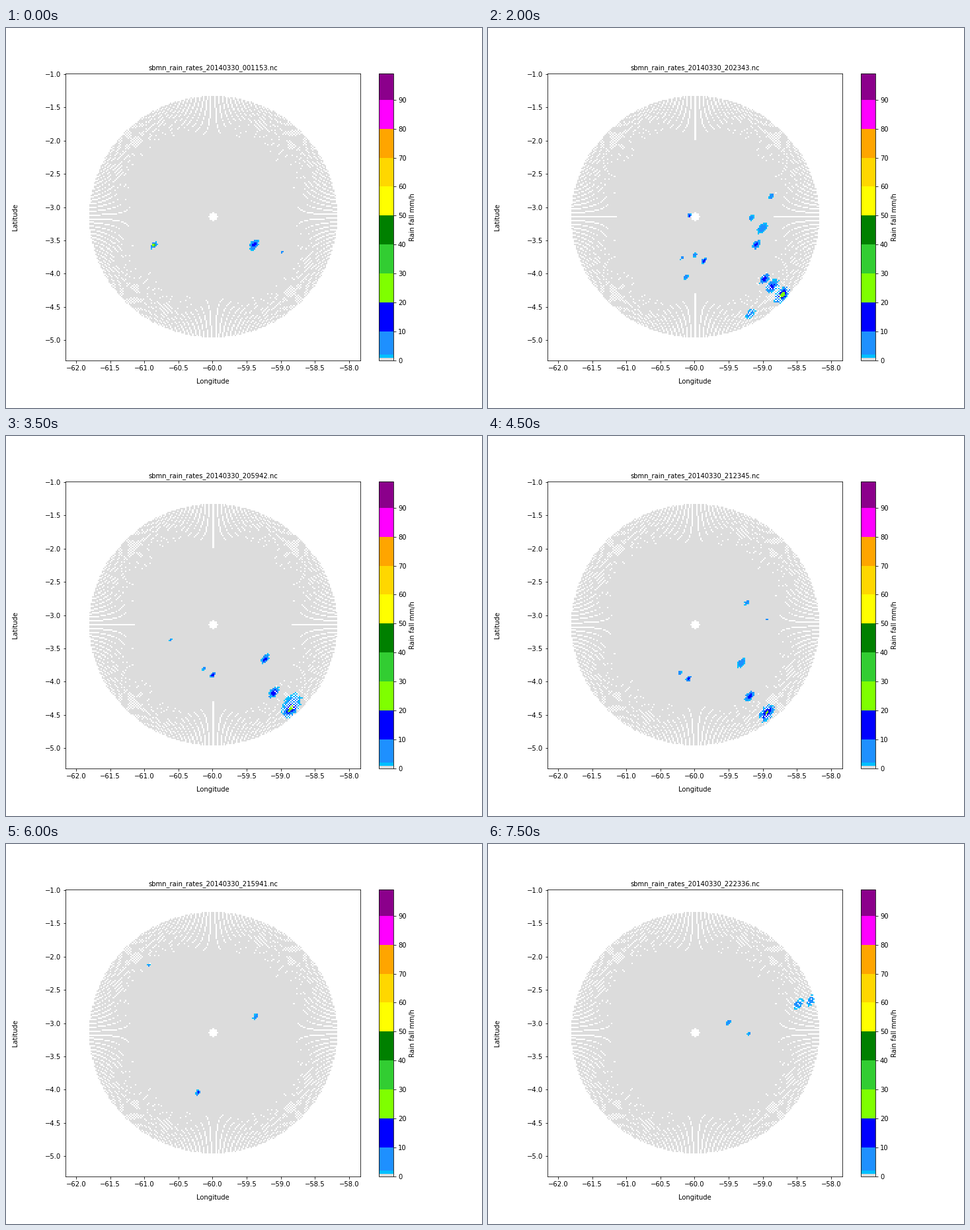
Animation of 720x576 px, one loop 8000 ms. Source, as a matplotlib script:

```python
import numpy as np
import matplotlib.pyplot as plt
from matplotlib.animation import FuncAnimation
from matplotlib.cm import ScalarMappable
from matplotlib.colors import BoundaryNorm, ListedColormap, to_rgba_array

W, H, FRAMES = 720, 576, 16
LON, LAT = -59.992, -3.149          # radar site
SPAN_X, SPAN_Y = 2.1635, 2.157      # half width of the map in degrees
LEFT, RIGHT, TOP, BOTTOM = 90, 536.4, 69.12, 504
CX, CY = (LEFT + RIGHT) / 2, (TOP + BOTTOM) / 2
PX, PY = (RIGHT - LEFT) / 2 / SPAN_X, (BOTTOM - TOP) / 2 / SPAN_Y
CELL, HALF = .02, 95                # grid step in degrees, cells each way
GATES = np.arange(8, 201) / 111.2   # 1 km gates in degrees
WIND = np.array([-4.6, 3])          # pixels per frame
TILT = np.radians(50)

LEVELS = [0, 1, 2, *range(10, 100, 10), 99]
COLORS = ["gainsboro", "deepskyblue", "dodgerblue", "blue", "chartreuse",
          "limegreen", "green", "yellow", "gold", "orange", "magenta",
          "darkmagenta"]
SECONDS = [53, 46, 41, 42, 43, 41, 38, 42, 44, 45, 42, 39, 41, 41, 43, 36]

storms = []


def storm(birth, life, x, y, size, peak):
    storms.append((birth, life, np.array([x, y]), size, peak))


def clock(t):
    """A scan every 12 minutes, first at night, then in the afternoon."""
    minute = 11 + 12 * t if t < 2 else 1175 + 12 * (t - (t > 12))
    return f"{minute // 60:02d}{minute % 60:02d}{SECONDS[t]:02d}"


# night
storm(0, 1, 224, 330, 5, 45)
storm(0, 1, 375, 329, 8, 16)
storm(0, 0, 417, 339, 2.2, 5)
# south-east storm and its flank
storm(3, 8, 449, 402, 14, 30)
storm(3, 8, 423, 377, 9, 20)
storm(3, 2, 434, 389, 11, 15)
storm(5, 2, 440, 402, 18, 7)
storm(3, 2, 401, 430, 8, 4)
# cells over the centre and the east
storm(3, 6, 410, 326, 7, 17)
storm(3, 11, 331, 350, 4.5, 18)
storm(4, 7, 313, 344, 3, 9)
storm(3, 3, 433, 252, 5, 6)
storm(3, 3, 403, 285, 5, 6)
storm(4, 1, 414, 304, 9, 5)
storm(3, 3, 304, 375, 4.5, 6)
storm(4, 2, 304, 285, 3, 14)
storm(9, 6, 391, 253, 4, 10)
# late echoes near the eastern rim
storm(13, 2, 478, 237, 8, 11)
storm(13, 2, 497, 232, 8, 5)

# brief light showers
rng = np.random.default_rng(7)
for birth in range(3, FRAMES):
    r, a = rng.uniform(40, 150), rng.uniform(0, 2 * np.pi)
    storm(birth, 0, CX + r * np.cos(a), CY + r * np.sin(a),
          rng.uniform(1.5, 3), 4)


def rain(t, x, y):
    field = np.zeros(x.shape)
    rough = np.random.default_rng(t).uniform(.7, 1.35, x.shape)
    for birth, life, start, size, peak in storms:
        age = t - birth
        if not 0 <= age <= life:
            continue
        cx, cy = start + WIND * age
        power = 4 + (peak - 4) * (1 - (age / (life + .3)) ** 4)
        dx, dy = x - cx, cy - y
        along = (dx * np.cos(TILT) + dy * np.sin(TILT)) / size
        across = (dy * np.cos(TILT) - dx * np.sin(TILT)) / (.58 * size)
        q = (along ** 2 + across ** 2) * rough
        field = np.maximum(field, power * (1.1 / power) ** np.minimum(q, 4))
    return field


def sweep(t):
    """Bin one-degree rays into the map grid; cells no ray meets stay empty."""
    shift = .5 if t % 3 else .05
    az = np.radians(np.arange(360) + shift)[:, None]
    lon = GATES * np.sin(az) / np.cos(np.radians(LAT))
    lat = GATES * np.cos(az)
    level = np.digitize(rain(t, CX + lon * PX, CY - lat * PY), LEVELS)
    col = HALF + np.rint(lon / CELL).astype(int)
    row = HALF - np.rint(lat / CELL).astype(int)
    grid = np.zeros((2 * HALF + 1,) * 2, int)
    np.maximum.at(grid, (row, col), level)
    return palette[grid]


palette = np.vstack([[1, 1, 1, 0], to_rgba_array(COLORS)])

fig = plt.figure(figsize=(W / 72, H / 72), dpi=72, facecolor="white")
fig.subplots_adjust(left=.125, right=.9, bottom=.125, top=.88)
ax = fig.add_subplot()
reach = (HALF + .5) * CELL
image = ax.imshow(sweep(0), aspect="auto", interpolation="nearest",
                  extent=(LON - reach, LON + reach, LAT - reach, LAT + reach))
ax.set_xlim(LON - SPAN_X, LON + SPAN_X)
ax.set_ylim(LAT - SPAN_Y, LAT + SPAN_Y)
ax.set_xticks(np.arange(-62, -57.9, .5))
ax.set_yticks(np.arange(-5, -.9, .5))
ax.set_xlabel("Longitude", labelpad=10)
ax.set_ylabel("Latitude", labelpad=40)
title = ax.set_title("", fontsize=10)

cmap = ListedColormap(COLORS)
scale = ScalarMappable(BoundaryNorm(LEVELS, cmap.N), cmap)
bar = fig.colorbar(scale, ax=ax, spacing="proportional",
                   ticks=range(0, 100, 10), label="Rain fall mm/h")
bar.ax.minorticks_off()


def update(t):
    image.set_data(sweep(t))
    title.set_text(f"sbmn_rain_rates_20140330_{clock(t)}.nc")
    return image, title


anim = FuncAnimation(fig, update, frames=FRAMES, interval=500, repeat=True,
                     repeat_delay=0, blit=False)
plt.show()
```
